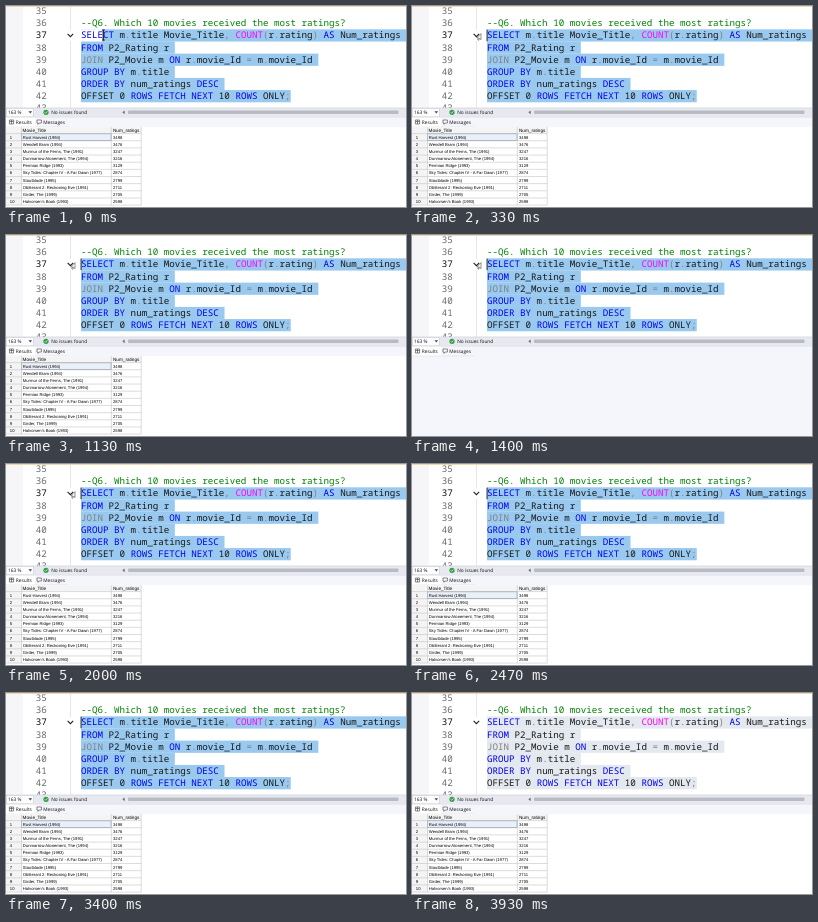
An HTML page that plays this animation: 400x201 px, repeating every 4000 ms.

```html
<!DOCTYPE html>
<html lang="en">
<head>
<meta charset="utf-8">
<title>Query run</title>
<style>
  html, body { margin: 0; width: 100%; height: 100%; overflow: hidden; background: #fff; }
  svg { display: block; width: 100vw; height: 100vh; text-rendering: geometricPrecision; }
  .code { font: 500 9.2px "Noto Sans Mono", "DejaVu Sans Mono", monospace; white-space: pre; }
  .ui { font: 500 4.8px "Open Sans", "Noto Sans", sans-serif; fill: #111; }
  .grid { font: 4.2px "Liberation Sans", sans-serif; fill: #000; }
  .head { font-size: 4.65px; }
  .k { fill: #0000f0; } .g { fill: #808080; } .f { fill: #f0f; } .c { fill: #008000; }

  /* one shared clock, hard cuts only */
  .sel, .gap, .caret, .beam, .arrow, .grid, .focus { animation: 4s step-end infinite; }
  .sel { fill: #99c9ef; animation-name: sel; }
  .gap { fill: #fff; transform-origin: 75px 0; animation-name: gap; }
  .caret { animation-name: caret; }
  .beam { animation-name: beam; }
  .arrow { animation-name: arrow; }
  .grid { animation-name: grid; }
  .focus { animation-name: focus; }
  @keyframes sel { 0% { fill: #99c9ef; } 96.7%, 100% { fill: #e4e8ef; } }
  @keyframes gap { 0% { transform: scaleX(1); } 1.75% { transform: scaleX(.5); } 3.5%, 100% { transform: scaleX(0); } }
  @keyframes caret { 0% { transform: translateX(22px); } 1.75% { transform: translateX(11px); } 3.5% { transform: none; opacity: 1; } 96.7%, 100% { opacity: 0; } }
  @keyframes beam { 0% { opacity: 1; } 3.5%, 100% { opacity: 0; } }
  @keyframes arrow { 0% { opacity: 0; } 3.5% { opacity: 1; } 55%, 100% { opacity: 0; } }
  @keyframes grid { 0% { opacity: 1; } 31.7% { opacity: 0; } 45%, 100% { opacity: 1; } }
  @keyframes focus { 0% { opacity: 1; } 31.7% { opacity: 0; } 60%, 100% { opacity: 1; } }
</style>
</head>
<body>
<svg viewBox="0 0 400 201" preserveAspectRatio="none">
  <rect width="400" height="201" fill="#fff"/>
  <rect width="17" height="102" fill="#f6f6f9"/>
  <path d="M64.5 0V24M64.5 35V102" stroke="#dcdcdc" stroke-width=".7"/>
  <g id="selection" class="sel"></g>
  <rect class="gap" x="75" y="23.3" width="22" height="12.15"/>
  <g id="editor" class="code"></g>
  <rect class="caret" x="74.6" y="23.6" width=".9" height="11.6" fill="#111"/>
  <path class="beam" d="M96 24h3M97.5 24v10M96 34h3" stroke="#222" stroke-width=".8"/>
  <path d="M61.6 27.8l2.8 2.8 2.8-2.8" fill="none" stroke="#222" stroke-width="1.1"/>
  <path class="arrow" d="M69 27.6v6l-1.4-1.3-1 2-.9-.5 1-1.9h-1.9z" fill="#fff" stroke="#222" stroke-width=".5"/>
  <rect width="400" height=".9" fill="#eed6a4"/>

  <g class="ui">
    <rect y="101.8" width="400" height="9.6" fill="#e8e9f0"/>
    <path d="M0 102H400M0 111.3H400" stroke="#cdd0da" stroke-width=".6"/>
    <rect x=".3" y="102.6" width="27" height="8.2" fill="#fdfdfe" stroke="#c4c7d2" stroke-width=".5"/>
    <text x="2" y="107.9">163 %</text>
    <path d="M22.5 105.2h3.6l-1.8 2.2z" fill="#444"/>
    <circle cx="40" cy="106.3" r="2.6" fill="#2f9e44"/>
    <path d="M38.7 106.3l1 1 1.7-2" fill="none" stroke="#fff" stroke-width=".7"/>
    <text x="45.2" y="107.9">No issues found</text>
    <path d="M118.6 104.4v3.8l-2.2-1.9z" fill="#666"/>
    <rect x="122" y="104.6" width="270.5" height="3.4" rx="1" fill="#b9bbc3"/>

    <rect y="111.6" width="400" height="89.4" fill="#f5f5fc"/>
    <rect y="111.8" width="29" height="9.4" fill="#fff"/>
    <g fill="#fff" stroke="#555" stroke-width=".7">
      <path d="M3.4 114h4.2v4h-4.2zM3.4 115.5h4.2M5.5 114v4"/>
      <path d="M31 114h4.4v3h-2.4l-1 1.3v-1.3h-1z"/>
    </g>
    <text x="9.8" y="117.8">Results</text>
    <text x="37.2" y="117.8">Messages</text>
    <path d="M0 121H63" stroke="#d4d6df" stroke-width=".5"/>

    <g class="grid">
      <rect y="121.2" width="400" height="79.8" fill="#fff"/>
      <path d="M0 121.2H135.2V127.6H15.5V199.1H0z" fill="#f4f4f5"/>
      <rect class="focus" x="15.7" y="127.8" width="89.4" height="6.8" fill="#eaf0f8" stroke="#667d9e" stroke-width=".6"/>
      <g id="rows"></g>
    </g>
  </g>
</svg>
<script>
  const pitch = 12.15, charW = 5.52, left = 75, firstMid = 5.1;
  // runs are separated by "|", with an optional class letter before "~"
  const lines = [
    "", "c~--Q6. Which 10 movies received the most ratings?",
    "k~SELECT| m|g~.|title Movie_Title|g~,| |f~COUNT|g~(|r|g~.|rating|g~)| |k~AS| Num_ratings",
    "k~FROM| P2_Rating r",
    "g~JOIN| P2_Movie m |k~ON| r|g~.|movie_Id |g~=| m|g~.|movie_Id",
    "k~GROUP BY| m|g~.|title",
    "k~ORDER BY| num_ratings |k~DESC",
    "OFFSET 0 |k~ROWS FETCH NEXT| 10 |k~ROWS| ONLY|g~;",
    ""
  ];
  const firstSel = 2, lastSel = 7;
  const films = [
    ["Rust Harvest (1994)", 3498],
    ["Wendell Bram (1994)", 3476],
    ["Murmur of the Ferns, The (1991)", 3247],
    ["Dunmarrow Atonement, The (1994)", 3216],
    ["Permian Ridge (1993)", 3129],
    ["Sky Tides: Chapter IV - A Far Dawn (1977)", 2874],
    ["Stoutblade (1995)", 2799],
    ["Obliterant 2: Reckoning Eve (1991)", 2711],
    ["Girder, The (1999)", 2705],
    ["Halvorsen's Book (1993)", 2598]
  ];
  const fill = (id, html) => document.getElementById(id).innerHTML = html;
  const text = (x, y, s, attrs = "") => `<text x="${x}" y="${y}" ${attrs}>${s}</text>`;

  let code = "", marks = "";
  lines.forEach((line, i) => {
    const mid = firstMid + i * pitch;
    let length = 0;
    const spans = line.split("|").map(run => {
      const [, cls = "", body] = run.match(/^(?:([kgfc])~)?(.*)$/);
      length += body.length;
      return `<tspan class="${cls}">${body}</tspan>`;
    }).join("");
    code += text(29.7, mid + 3, 35 + i, `fill="${i === firstSel ? "#111" : "#666b70"}"`);
    code += text(left, mid + 3, spans, 'fill="#181818"');
    if (i >= firstSel && i <= lastSel) {
      const newline = i < lastSel ? 1 : 0;
      marks += `<rect x="${left}" y="${mid - 6.1}" width="${(length + newline) * charW}" height="${pitch + .1}"/>`;
    }
  });
  fill("editor", code);
  fill("selection", marks);

  const rowH = 7.15, top0 = 127.6, numX = 107, right = 135.2;
  let rows = text(16.6, 126, "Movie_Title", 'class="head"') + text(numX, 126, "Num_ratings", 'class="head"');
  let rules = `M0 ${top0}H${right}M15.5 121.2V199.1M105.3 121.2V199.1M${right} 121.2V199.1`;
  films.forEach(([title, count], i) => {
    const y = top0 + i * rowH, base = y + 5.1;
    rules += `M0 ${y + rowH}H${right}`;
    rows += text(3.8, base, i + 1) + text(16.8, base, title) + text(numX, base, count);
  });
  fill("rows", `<path d="${rules}" stroke="#c4c4c8" stroke-width=".6" fill="none"/>` + rows);
</script>
</body>
</html>
```
